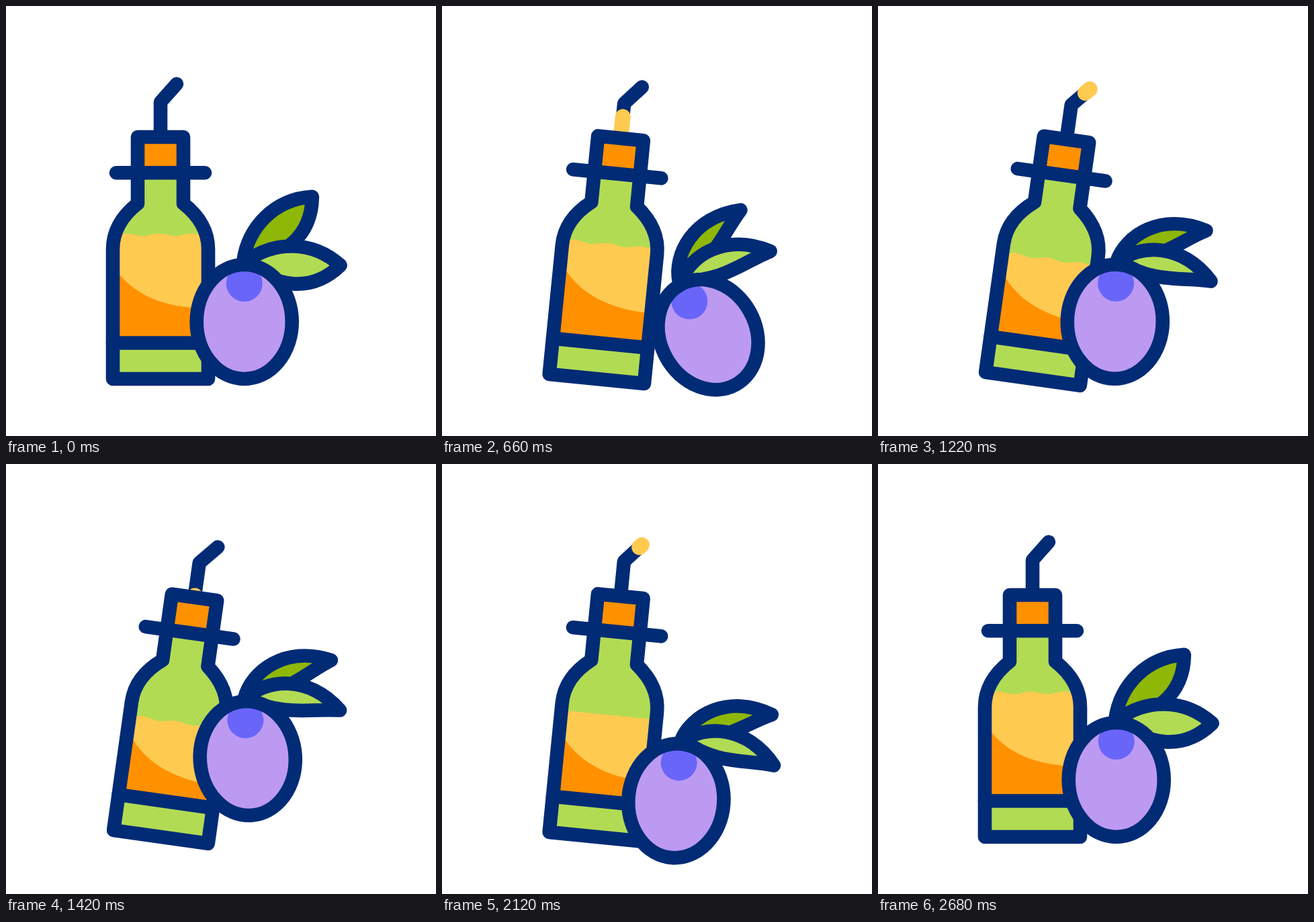
An HTML page with a canvas that plays this animation: 640x640 px, repeating every 3.02 s.

```html
<!DOCTYPE html>
<html lang="en">
<head>
<meta charset="utf-8">
<title>Oil bottle and olive</title>
<style>
html, body { margin: 0; height: 100%; overflow: hidden; background: #fff; }
canvas { display: block; width: 640px; height: 640px; }
</style>
</head>
<body>
<canvas width="640" height="640"></canvas>
<script>
const ctx = document.querySelector('canvas').getContext('2d');
const LOOP = 3020, DEGREE = Math.PI / 180, LINE = 20.6;
const NAVY = '#022b76', LIME = '#b2db54', LEAF = '#8fb708', YELLOW = '#ffca50',
  ORANGE = '#ff9100', LILAC = '#bc9af2', VIOLET = '#6a65f9';

const bottle = new Path2D('M196 195H264V294C288 313 301 336 301 362V555H159V362C159 336 172 313 196 294Z');
const bands = new Path2D('M164 248.3H296M159 501.5H301');
const straw = new Path2D('M230 196V143L254 116');
const STRAW_LENGTH = 89;
const olive = new Path2D();
olive.ellipse(0, 85, 71, 85, 0, 0, 7);
const bud = new Path2D();
bud.arc(0, 28, 27, 0, 7);

const mix = (a, b, x) => a + (b - a) * x;
// Progress from 0 to 1 between two times, steady or eased.
const ramp = (t, from, to) => Math.min(1, Math.max(0, (t - from) / (to - from)));
const ease = (t, from, to) => (1 - Math.cos(Math.PI * ramp(t, from, to))) / 2;
// Rises to 1 at the peak and falls back to 0.
const bump = (t, from, peak, to, curve = ease) => curve(t, from, peak) - curve(t, peak, to);

function fill(path, color) {
  ctx.fillStyle = color;
  ctx.fill(path);
}

function stroke(path, color = NAVY, width = LINE) {
  ctx.strokeStyle = color;
  ctx.lineWidth = width;
  ctx.stroke(path);
}

function group(x, y, degrees, paint) {
  ctx.save();
  ctx.translate(x, y);
  ctx.rotate(degrees * DEGREE);
  paint();
  ctx.restore();
}

function clipped(path, paint) {
  ctx.save();
  ctx.clip(path);
  paint();
  ctx.restore();
}

function drawStraw(t) {
  stroke(straw);
  for (const start of [516, 1405]) {
    const head = ramp(t, start, start + 390) * STRAW_LENGTH;
    const tail = ramp(t, start + 480, start + 730) * STRAW_LENGTH;
    if (head <= tail) continue;
    ctx.setLineDash([head - tail, 1000]);
    ctx.lineDashOffset = -tail;
    stroke(straw, YELLOW, 23);
    ctx.setLineDash([]);
  }
}

function drawLiquid(t) {
  const level = 340.5 + 54 * bump(t, 300, 1740, 2680, ramp);
  const wave = 1.8 * (1 - bump(t, 1740, 2120, 2680));
  const shade = 27 * bump(t, 800, 1740, 2680, ramp);

  const oil = new Path2D('M301 501H159');
  for (let x = 159; x <= 301; x += 2) {
    oil.lineTo(x, level + wave * Math.cos((x - 203) / 49 * 2 * Math.PI));
  }
  fill(oil, YELLOW);
  group(0, shade, 0, () =>
    fill(new Path2D(`M159 386C187 430 235 450 301 450V${501 - shade}H159Z`), ORANGE));
}

function drawBottle(t) {
  const tilt = 8 * (ease(t, 300, 865) - ease(t, 1910, 2490));
  group(230, 558, tilt, () => {
    ctx.translate(-230, -558);
    drawStraw(t);
    fill(bottle, LIME);
    clipped(bottle, () => {
      ctx.fillStyle = ORANGE;
      ctx.fillRect(196, 195, 68, 53);
      drawLiquid(t);
    });
    stroke(bottle);
    stroke(bands);
  });
}

// A leaf along the x axis; bending lifts its underside and arches its back.
function drawLeaf(angle, bend, color) {
  group(0, 0, angle, () => {
    const path = new Path2D();
    path.moveTo(3, -5);
    path.bezierCurveTo(mix(43, 28, bend), -35, mix(100, 90, bend), mix(-38, -50, bend), 143, 0);
    path.bezierCurveTo(100, mix(42, 1, bend), mix(45, 60, bend), mix(34, 18, bend), 3, -5);
    path.closePath();
    fill(path, color);
    stroke(path);
  });
}

function drawOlive(t) {
  const drop = 52 * bump(t, 420, 860, 1500) - 35 * bump(t, 860, 1500, 1920)
    + 43 * bump(t, 1500, 1920, 2500);
  const swing = -30 * bump(t, 300, 630, 930) + 5 * bump(t, 630, 930, 1700)
    - 6.8 * bump(t, 930, 1700, 2000) + 5 * bump(t, 1700, 2000, 2490);
  const bend = ease(t, 300, 630) - ease(t, 2120, 2600);
  group(354.7, 385 + drop, swing, () => {
    drawLeaf(mix(-45, -22, bend), bend, LEAF);
    drawLeaf(mix(0.4, 8.7, bend), bend, LIME);
    fill(olive, LILAC);
    clipped(olive, () => fill(bud, VIOLET));
    stroke(olive);
  });
}

function draw() {
  const t = performance.now() % LOOP;
  ctx.clearRect(0, 0, 640, 640);
  ctx.lineCap = ctx.lineJoin = 'round';
  drawBottle(t);
  drawOlive(t);
  requestAnimationFrame(draw);
}
draw();
</script>
</body>
</html>
```
